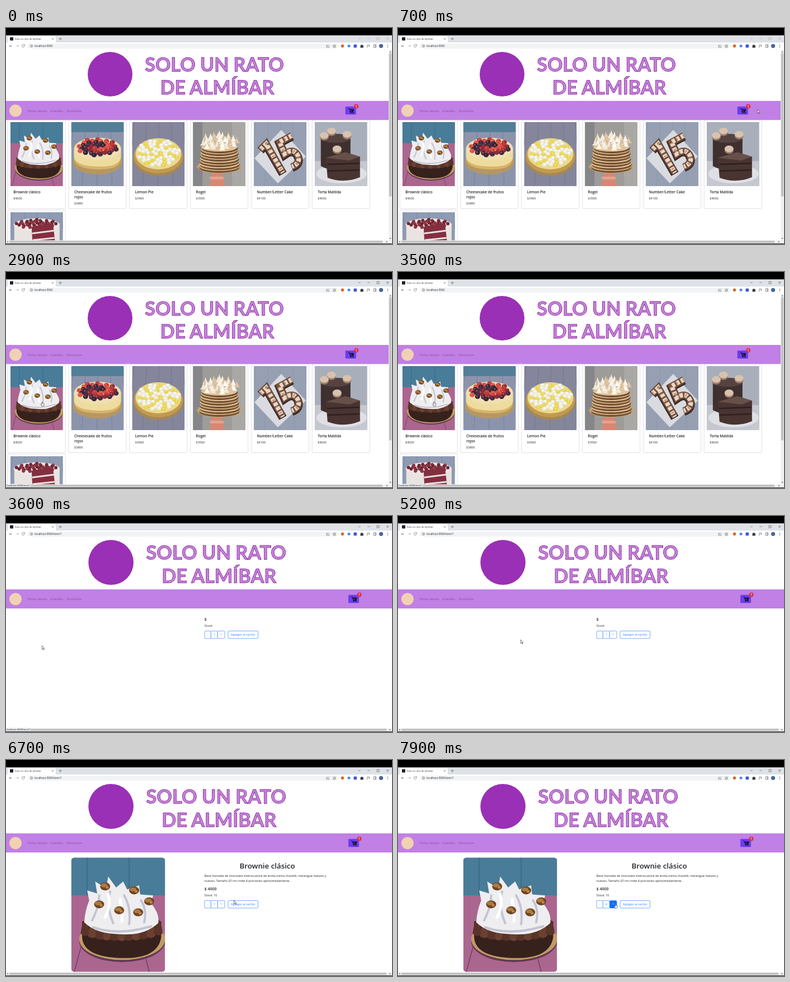
Write an HTML page that moves like this. It is 690 px wide and 388 px high and loops after 8000 ms.

```html
<!DOCTYPE html>
<html lang="es">
<head>
<meta charset="utf-8">
<title>Solo un rato de almíbar</title>
<style>
  html, body { margin: 0; height: 100%; overflow: hidden; background: #fff; }
  svg { display: block; width: 100vw; height: 100vh; }
  text { font: 5.4px "Open Sans", "Noto Sans", sans-serif; fill: #212529; white-space: pre; }
  .bold { font-weight: 600; }
  .mid { text-anchor: middle; }
  .white { fill: #fff; font-weight: 600; text-anchor: middle; }
  .banner { font: 700 34px Lato, sans-serif; fill: url(#hatch); stroke: #8a1fa8; stroke-width: .8; text-anchor: middle; }
  .nav { fill: #81509c; }
  .line { fill: none; stroke: #555; stroke-width: .65; }
  .btn rect { fill: #fff; stroke: #3b88fd; stroke-width: .7; }
  .btn text { fill: #2f7ffd; text-anchor: middle; }
  .btn.on rect { fill: #0d6efd; }
  .btn.on text { fill: #fff; }
  .off text { fill: #7d9fd0; }
</style>
</head>
<body>
<svg id="stage" viewBox="0 0 690 388"></svg>
<script>
const stage = document.getElementById('stage');
const SHOP = 'Solo un rato de almíbar';

// --- markup helpers ---
const rect = (x, y, w, h, fill, more = '') =>
  `<rect x="${x}" y="${y}" width="${w}" height="${h}" fill="${fill}" ${more}/>`;
const oval = (x, y, rx, ry, fill, more = '') =>
  `<ellipse cx="${x}" cy="${y}" rx="${rx}" ry="${ry}" fill="${fill}" ${more}/>`;
const dot = (x, y, r, fill) => oval(x, y, r, r, fill);
const path = (d, fill, more = '') => `<path d="${d}" fill="${fill}" ${more}/>`;
const line = (d, more = '') => `<path class="line" d="${d}" ${more}/>`;
const text = (x, y, s, cls = '', size = 5.4) =>
  `<text x="${x}" y="${y}" class="${cls}" style="font-size:${size}px">${s}</text>`;
const repeat = (n, fn) => Array.from({ length: n }, (_, i) => fn(i)).join('');

// Evenly spread points inside an ellipse, drawn back to front.
const scatter = (n, cx, cy, rx, ry, fn) =>
  Array.from({ length: n }, (_, i) => {
    const a = i * 2.4, r = Math.sqrt((i + .5) / n);
    return [cx + rx * r * Math.cos(a), cy + ry * r * Math.sin(a), i];
  }).sort((p, q) => p[1] - q[1]).map(p => fn(...p)).join('');

const wood = (base, seam) => rect(0, 0, 94, 115, base) +
  repeat(5, i => path(`M${i * 22 + 4} 0L${i * 27 - 8} 115`, 'none', `stroke="${seam}" stroke-width=".7"`));

// --- cake pictures, 94 x 115 each ---
const walnut = (x, y) => oval(x, y, 5, 4, '#70451f') + oval(x - 1, y - 1, 3.3, 2, '#ad7a43') + oval(x + 2, y + 1, 1.5, 1.3, '#b58650');
const digits = ['M12 49L22 39L52 91', 'M68 24L46 36L55 57Q72 45 79 61Q84 74 68 80'];
const cakes = [
  { name: ['Brownie clásico'], price: 4000, art:
    rect(0, 0, 94, 115, '#aa668f') + rect(0, 0, 94, 38, '#487c98') +
    path('M16 0V38M58 0V38', 'none', 'stroke="#3d6b85"') +
    path('M24 38L3 115M72 90L78 115', 'none', 'stroke="#7d456c"') +
    oval(51, 84, 43, 21, '#60384f') + oval(51, 82, 43, 21, '#c09b65') +
    path('M11 64V81Q13 100 50 101T90 80V64Z', '#37211d') +
    repeat(11, i => {
      const x = 14 + i * 7.3, y = 67 + 11 * Math.sqrt(1 - ((x - 50) / 42) ** 2);
      return path(`M${x - 4.5} ${y + 4}Q${x - 3} ${y - 9} ${x} ${y - 10}Q${x + 3} ${y - 9} ${x + 4.5} ${y + 4}Q${x} ${y + 8} ${x - 4.5} ${y + 4}Z`, i % 2 ? '#6a4031' : '#593428');
    }) +
    path('M13 65Q14 53 18 43L16 33L26 36L24 24L35 31L37 19L45 30L52 24L56 32L68 28L69 37L82 38L80 46Q89 57 87 66Q73 79 50 77Q25 77 13 65Z', '#eeedf0') +
    path('M21 63Q28 49 28 38M42 66Q35 49 39 34M58 67Q60 50 53 38M73 65Q76 53 70 43M22 70Q47 79 80 69', 'none', 'stroke="#c3c4d2" stroke-width="2.2" stroke-linecap="round"') +
    path('M34 60Q40 48 37 37M51 64Q50 48 49 42', 'none', 'stroke="#fff" stroke-width="3" stroke-linecap="round"') +
    [[34, 29], [63, 33], [28, 47], [78, 44], [48, 53], [67, 55]].map(p => walnut(...p)).join('') },
  { name: ['Cheesecake de frutos', 'rojos'], price: 3800, art:
    wood('#8c94ac', '#6f7890') + rect(0, 0, 94, 18, '#527f97') +
    oval(47, 73, 44, 21, '#b59761') +
    path('M5 47V67Q8 84 47 85T89 67V47Z', '#d8b36b') + path('M5 47V63Q8 79 47 80T89 63V47Z', '#eedb9e') +
    oval(47, 48, 42, 20, '#efdfb1') +
    scatter(44, 47, 45, 35, 15, (x, y, i) => oval(x, y, 4.6, 4, ['#352637', '#c83a38', '#482b43', '#df5548', '#8f2932'][i % 5]) + dot(x - 1, y - 1, 1, i % 2 ? '#ea806c' : '#66516b')) },
  { name: ['Lemon Pie'], price: 3400, art:
    wood('#85869c', '#6f7087') +
    oval(47, 66, 45, 31, '#a28859') + oval(47, 61, 44, 31, '#c29a50') + oval(47, 57, 41, 28, '#ead98c') +
    scatter(70, 47, 55, 37, 24, (x, y, i) => oval(x, y, 3.8, 3.3, i % 3 ? '#eeece1' : '#e8d34f') + dot(x, y - 1, 1.4, i % 3 ? '#fff' : '#f3e787')) },
  { name: ['Rogel'], price: 3500, art:
    rect(0, 0, 94, 115, '#9d9c98') + rect(0, 0, 17, 115, '#85868a') + rect(70, 0, 24, 115, '#aaa8a4') +
    path('M30 115L34 92H52L57 115Z', '#d78774') + rect(30, 98, 25, 5, '#e5a28f', 'rx="2"') +
    oval(47, 80, 40, 12, '#c3a270') +
    repeat(8, i => oval(47 + (i % 2), 82 - i * 5, 36 - i * .5, 9, '#6f4a30') + oval(47, 80 - i * 5, 36 - i * .5, 8, i % 2 ? '#dcc198' : '#c8a470')) +
    scatter(38, 47, 36, 33, 13, (x, y, i) => path(`M${x - 6} ${y + 3}Q${x - 2} ${y} ${x} ${y - 9}Q${x + 2} ${y} ${x + 6} ${y + 3}Z`, ['#f1e9dc', '#dfc4a0', '#fffaf0'][i % 3])) },
  { name: ['Number/Letter Cake'], price: 4100, art:
    wood('#96a0b2', '#8792a6') + path('M1 65L49 14L93 62L43 110Z', '#d9dbe0') +
    digits.map(d => path(d, 'none', 'stroke="#3f2b27" stroke-width="15" transform="translate(0 2)"') +
      path(d, 'none', 'stroke="#79513e" stroke-width="12"') +
      path(d, 'none', 'stroke="#e6d8c6" stroke-width="8" stroke-dasharray="6 3"') +
      path(d, 'none', 'stroke="#b88975" stroke-width="5" stroke-dasharray="2 11"')).join('') },
  { name: ['Torta Matilda'], price: 4600, art:
    rect(0, 0, 94, 115, '#a8afba') + rect(0, 70, 94, 45, '#c5c8cf') +
    oval(48, 93, 45, 17, '#dfe0e5') +
    path('M11 30Q35 18 64 28V83Q34 92 11 79Z', '#3f302f') + oval(37, 29, 27, 8, '#554341') +
    path('M20 64L81 62V99Q52 111 23 100Z', '#493431') + path('M20 64L55 54L81 62L62 69Z', '#665049') +
    path('M22 76L80 74M23 88L80 86', 'none', 'stroke="#2c2020" stroke-width="2.5"') +
    [[30, 17], [17, 25], [58, 23], [40, 49]].map(([x, y]) => oval(x, y + 2, 8, 6, '#9d7f6d') + oval(x, y - 1, 8, 6, '#d8c2ae')).join('') },
  { name: [], art:
    wood('#8e9bb2', '#78869f') +
    path('M7 22V65H88V22Z', '#e9e3e1') + oval(47, 22, 41, 11, '#efe9e6') +
    scatter(40, 47, 21, 37, 8, (x, y, i) => dot(x, y, 3, i % 2 ? '#8d3545' : '#6f2735')) +
    path('M38 26L76 19L81 62H40Z', '#842f40') + path('M39 38L78 33M40 50L79 46', 'none', 'stroke="#f0dfdf" stroke-width="3"') }
];

// --- page parts ---
const STEP = 108.8;
const cardAt = i => ({ x: 3.2 + STEP * (i % 6), y: 165 + 162 * Math.floor(i / 6) });
const card = (cake, i) => {
  const { x, y } = cardAt(i), lines = cake.name.length;
  return rect(x, y, 103, 159.5, '#fff', 'rx="2" stroke="#d5d5d8" stroke-width=".7"') +
    `<use href="#cake${i}" x="${x + 4.6}" y="${y + 4}" width="94" height="115"/>` +
    cake.name.map((s, k) => text(x + 10, y + 132 + 8.6 * k, s, 'bold', 6.5)).join('') +
    (lines ? text(x + 10, y + 134.5 + 8.6 * lines, '$' + cake.price) : '');
};

const header = width => {
  const scale = width / 684, y = 40 + 91 * scale, cart = width === 684 ? 606.7 : 612;
  return `<g transform="translate(0 40) scale(${scale})">` + dot(186, 43, 40, '#9a30b5') +
    text(372.5, 38, 'SOLO UN RATO', 'banner', 34) + text(377.5, 79, 'DE ALMÍBAR', 'banner', 34) + '</g>' +
    rect(0, y, width, 34.3, '#c180e5') + dot(17, y + 17.5, 11, '#f0d2b2') +
    text(38, y + 19.6, 'Tortas clásicas', 'nav') + text(79.5, y + 19.6, 'A pedido', 'nav') + text(108.3, y + 19.6, 'Numericas', 'nav') +
    rect(cart, y + 10, 19, 14.5, '#6b3df0', 'rx="1"') +
    path(`M${cart + 5} ${y + 13.5}h2l2 7h6M${cart + 7.5} ${y + 15}h7.5l-1 4h-5.5z`, '#1c1533', 'stroke="#1c1533" stroke-width=".9"') +
    dot(cart + 9.5, y + 22, .9, '#1c1533') + dot(cart + 14, y + 22, .9, '#1c1533') +
    dot(cart + 19.5, y + 9.7, 4, '#dc3545') + text(cart + 19.5, y + 11.5, '1', 'white', 5);
};

const scrollX = (start, end, right) => rect(0, 381.3, 690, 5.7, '#f1f1f1') +
  rect(start, 382.2, end - start, 3.8, '#c1c1c1') +
  path(`M3.7 382.6v3l-2-1.5zM${right} 382.6v3l2-1.5z`, '#555');

const button = (id, x, w, label, cls = '') =>
  `<g id="${id}" class="btn ${cls}">${rect(x, 252.6, w, 13.4, '#fff', 'rx="1.5"')}${text(x + w / 2, 261.2, label)}</g>`;

const chrome = rect(0, 0, 690, 13.5, '#000') + rect(0, 13.5, 690, 12.5, '#dee1e6') +
  path('M3 26V17Q3 14.5 5.5 14.5H86.5Q89 14.5 89 17V26Z', '#fff') + rect(0, 26, 690, 13.3, '#fff') +
  rect(39, 28, 555, 9, '#f1f3f4', 'rx="4.5"') + rect(7, 16.5, 6, 6, '#20232a', 'rx="1"') +
  text(16, 21.3, SHOP, '', 4.3) +
  line('M82 18l3 3m0-3l-3 3M94.5 19.5h5M97 17v5') +
  line('M11 32.2H6m2-2l-2 2l2 2') + line('M17.5 32.2h5m-2-2l2 2l-2 2', 'opacity=".5"') +
  line('M33 30.8A2.4 2.4 0 1 0 33.2 33M33.4 29.5v1.8h-1.8') +
  '<circle class="line" cx="45.5" cy="32.2" r="2.1"/>' + line('M45.5 31.8v1.5') +
  '<text id="url" x="51" y="34.1" style="font-size:4.8px"></text>' +
  line('M575 31h-2v3.5h4.5v-2M575 32.5l2.5-2.5') +
  line('M587 29.7l.8 1.8 2 .2-1.5 1.3.5 2-1.8-1-1.8 1 .5-2-1.5-1.3 2-.2z') +
  dot(601.5, 32.3, 2.8, '#d66a35') + dot(613, 32.3, 2.5, '#4f86ee') + rect(621.5, 29.7, 5.5, 5.5, '#3e55dc') +
  path('M633.5 30.7h1.5a1 1 0 0 1 2 0h1.5v1.5a1 1 0 0 1 0 2v1.2h-5z', '#3c4043') +
  line('M645 30.5h5M645 32.5h3M645 34.5h2M649.5 31v3') + line('M657 30h4.5v4.8h-4.5zM660 30v4.8') +
  dot(670.5, 32.3, 3.6, '#4865a4') + repeat(3, i => dot(682.5, 30.3 + 2 * i, .6, '#444')) +
  `<g id="controls">${line('M630 18l2 2 2-2M646.5 19h4M663 17h4v4h-4zM680 17l4 4m0-4l-4 4')}</g>`;

stage.innerHTML = `<defs>
  <pattern id="hatch" width="2.2" height="2.2" patternUnits="userSpaceOnUse" patternTransform="rotate(35)">
    ${rect(0, 0, 2.2, 2.2, '#ecd3f2')}${rect(0, 0, 1.2, 2.2, '#a044ba')}</pattern>
  <clipPath id="rounded">${rect(116.5, 175.3, 168, 205.5, '#000', 'rx="6"')}</clipPath>
  ${cakes.map((c, i) => `<symbol id="cake${i}" viewBox="0 0 94 115" preserveAspectRatio="none">${c.art}</symbol>`).join('')}</defs>
  ${rect(0, 0, 690, 388, '#fff')}
  <g id="list">${cakes.map(card).join('')}${header(684)}
    ${rect(684, 39.3, 6, 342, '#f1f1f1')}${rect(684.8, 45.5, 4.4, 257, '#c1c1c1')}
    ${path('M685.5 43.5h3l-1.5-2zM685.5 377h3l-1.5 2z', '#555')}${scrollX(6, 673, 680)}</g>
  <g id="item">${header(690)}
    <g id="details">
      <g clip-path="url(#rounded)"><use href="#cake0" x="116.5" y="175.3" width="168" height="205.5"/></g>
      ${text(467, 194.7, 'Brownie clásico', 'mid bold', 13.3)}
      ${text(354.8, 210.4, 'Base húmeda de chocolate intenso,dulce de leche,crema chantilli, merengue italiano y', '', 5.45)}
      ${text(354.8, 218.9, 'nueces. Tamaño 20 cm rinde 8 porciones aproximadamente.', '', 5.45)}</g>
    <g id="order"><text id="price" class="bold" x="354.8" y="233.8" style="font-size:7px"></text>
      <text id="stock" x="354.8" y="244.7"></text>
      ${button('minus', 355, 11.3, '-', 'off')}${button('count', 366.3, 12, '1')}${button('plus', 378.3, 12.7, '+')}
      ${button('add', 397, 53.5, 'Agregar al carrito')}</g>${scrollX(6, 680, 685.5)}</g>
  <g id="status">${rect(0, 380.5, 44, 6.5, '#e3e5e8', 'rx="1"')}<text id="link" x="1.5" y="385.3" style="font-size:4.1px"></text></g>
  ${rect(0, 387, 690, 1, '#222')}${chrome}
  <g id="cursor" stroke="#222" stroke-width=".6" stroke-linejoin="round">
    <path id="arrow" d="M0 0V6.6L1.5 5.3 2.6 7.6 3.6 7.1 2.6 4.9H4.7Z" fill="#fff"/>
    <path id="hand" d="M-.7 .5Q0-.6 .7 .5V2.6L3.3 3.2V5.5L2.6 7.4H-1L-2.6 4.5-1.8 3.8-.7 4.7Z" fill="#fff"/></g>`;

// --- timeline ---
const LOOP = 8000, OPEN = 3600, LOADED = 5600;
const moves = [[100, 688, 30], [900, 634, 168], [1800, 17, 217], [2400, 65, 233.5], [3600, 64.3, 233],
  [4500, 219.3, 222.2], [5500, 219.3, 222.2], [6300, 322.5, 225.5], [6400, 322.5, 225.5], [6700, 407.3, 252],
  [6800, 411, 255], [7100, 389, 258.5]];

const pointer = t => {
  const k = moves.findIndex(m => m[0] > t);
  if (k < 1) return (k ? moves.at(-1) : moves[0]).slice(1);
  const [a, b] = [moves[k - 1], moves[k]], p = (t - a[0]) / (b[0] - a[0]), e = p * p * (3 - 2 * p);
  return [a[1] + (b[1] - a[1]) * e, a[2] + (b[2] - a[2]) * e];
};

const el = Object.fromEntries([...stage.querySelectorAll('[id]')].map(n => [n.id, n]));
const show = (node, on) => node.style.display = on ? '' : 'none';
const within = (x, y, left, top, w, h) => x >= left && x <= left + w && y >= top && y <= top + h;

function draw(time) {
  const t = Math.floor(time % LOOP / 100) * 100;
  const [x, y] = pointer(t), open = t >= OPEN, loaded = t >= LOADED;
  const onPlus = loaded && within(x, y, 378.3, 252.6, 12.7, 13.4);
  const onAdd = loaded && within(x, y, 397, 252.6, 53.5, 13.4);
  const over = open ? -1 : cakes.findIndex((_, i) => {
    const c = cardAt(i);
    return t >= 100 && within(x, y, c.x, c.y, 103, 159);
  });

  show(el.list, !open);
  show(el.item, open);
  show(el.details, loaded);
  el.order.setAttribute('transform', `translate(0 ${loaded ? 0 : -46})`);
  el.price.textContent = loaded ? '$ 4000' : '$';
  el.stock.textContent = loaded ? 'Stock: 10' : 'Stock:';
  el.count.lastChild.textContent = 1 + [7300, 7600, 7900].filter(click => t >= click).length;
  el.plus.classList.toggle('on', onPlus);
  el.add.classList.toggle('on', onAdd);

  el.url.textContent = 'localhost:3000' + (open ? '/item/1' : '');
  el.controls.style.opacity = t < 2900 ? .4 : 1;
  show(el.status, over >= 0 || open && t < 4300);
  el.link.textContent = `localhost:3000/item/${over < 0 ? 1 : over + 1}`;

  const pointing = over >= 0 || onPlus || onAdd;
  show(el.cursor, t >= 100);
  show(el.hand, pointing);
  show(el.arrow, !pointing);
  el.cursor.setAttribute('transform', `translate(${x} ${y})`);
}

const start = performance.now();
(function tick() {
  draw(performance.now() - start);
  requestAnimationFrame(tick);
})();
</script>
</body>
</html>
```
